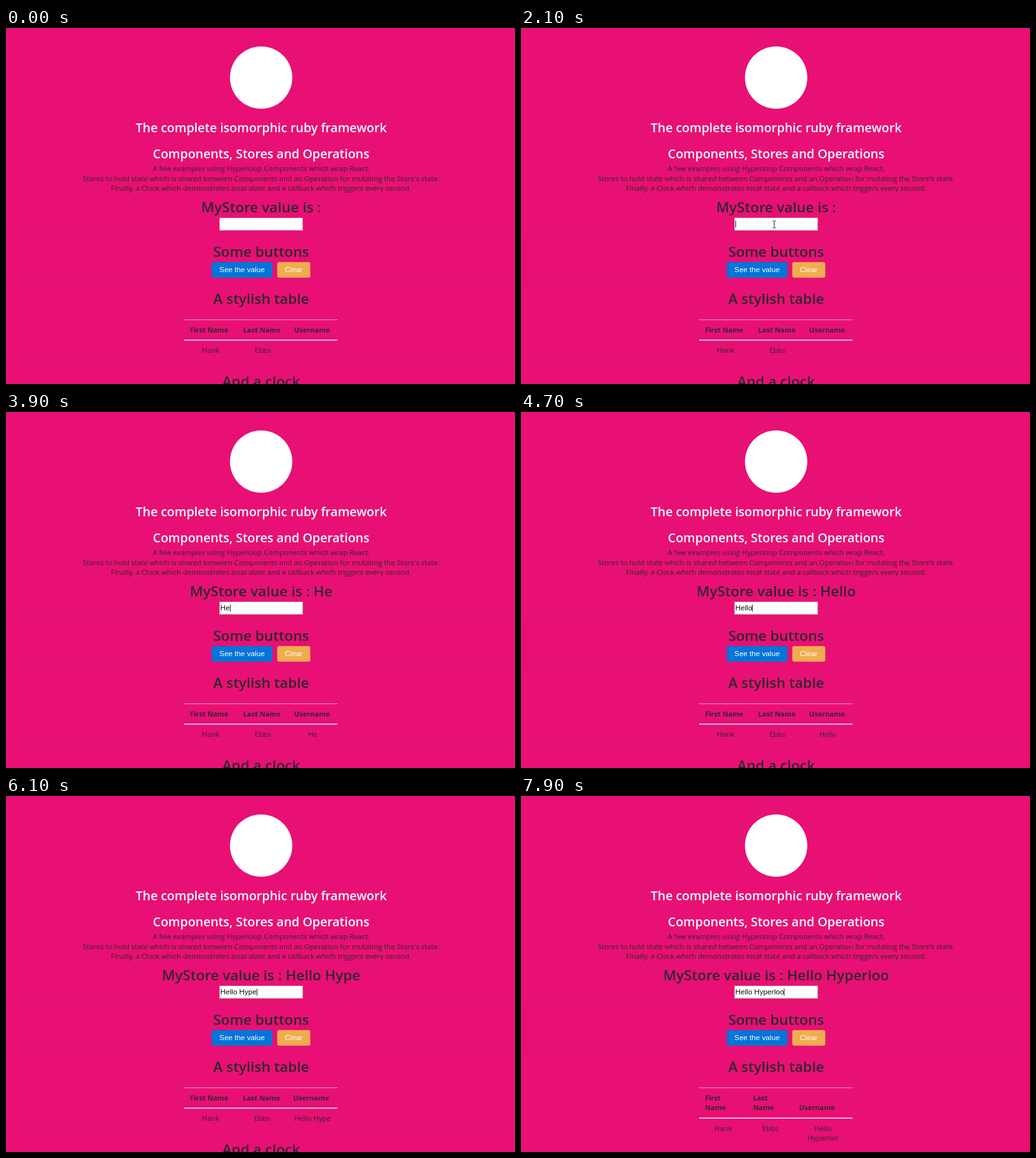
Recreate the animation shown at these times as an HTML page with a canvas. Size 800x560 px, loop 8000 ms.

```html
<!DOCTYPE html>
<html lang="en">
<head>
<meta charset="utf-8">
<title>Components, Stores and Operations</title>
<style>
  html, body { margin: 0; width: 800px; height: 560px; overflow: hidden; background: #e81074; }
  canvas { display: block; }
</style>
</head>
<body>
<canvas id="stage" width="800" height="560"></canvas>
<script>
const ctx = document.getElementById('stage').getContext('2d');

const LOOP = 8000;
const PINK = '#e81074', DARK = '#2d2730', WHITE = '#fff';
const SANS = '"Open Sans", "Noto Sans", sans-serif';
const ARIAL = '"Liberation Sans", Arial, sans-serif';
const TITLE = `600 19.5px ${SANS}`;
const HEADING = `600 22.4px ${SANS}`;
const BODY = `400 11.32px ${SANS}`;
const TH = `700 11px ${SANS}`;
const CONTROL = `11.67px ${ARIAL}`;

const MID = 401;
const PHRASE = 'Hello Hyperloo';
const KEYS = [3700, 3900, 4050, 4200, 4400, 4900, 5200, 5500, 5800, 6000, 6200, 6400, 6550, 6800];
const POINTER_IN = 1700, FOCUS = 2000;

function text(str, x, y, font, color = DARK, align = 'center') {
  ctx.font = font;
  ctx.fillStyle = color;
  ctx.textAlign = align;
  ctx.fillText(str, x, y);
}

function rect(x, y, w, h, color) {
  ctx.fillStyle = color;
  ctx.fillRect(x, y, w, h);
}

function button(label, x, w, color) {
  ctx.fillStyle = color;
  ctx.beginPath();
  ctx.roundRect(x, 368.2, w, 24.6, 3);
  ctx.fill();
  text(label, x + w / 2, 384, CONTROL, WHITE);
}

function header() {
  ctx.fillStyle = WHITE;
  ctx.beginPath();
  ctx.arc(MID, 78, 49, 0, Math.PI * 2);
  ctx.fill();
  text('The complete isomorphic ruby framework', MID, 164, TITLE, WHITE);
  text('Components, Stores and Operations', MID, 205, TITLE, WHITE);
  text('A few examples using Hyperloop Components which wrap React,', MID, 224.5, BODY);
  text("Stores to hold state which is shared between Components and an Operation for mutating the Store's state.", MID, 240.5, BODY);
  text('Finally, a Clock which demonstrates local state and a callback which triggers every second.', MID, 256, BODY);
}

function sectionEdges(shift) {
  const faint = 'rgba(120,0,60,.09)';
  for (const y of [330, 403, 533 + shift]) rect(5, y, 795, 1, faint);
  rect(5, 331, 1, 72, faint);
}

function field(value, t, lastKey) {
  const focused = t >= FOCUS;
  rect(335, 298, 132, 21, focused ? '#c9748f' : '#e05d96');
  rect(336, 299, 130, 19, WHITE);
  text(value, 336.8, 312, CONTROL, '#111', 'left');
  if (focused && (t - lastKey) % 1000 < 500) {
    rect(Math.round(336.8 + ctx.measureText(value).width), 303, 1, 11, '#222');
  }
  if (t >= POINTER_IN && t < KEYS[0]) pointer(398, 309);
}

function pointer(x, y) {
  rect(x - 0.5, y - 5, 1, 10, '#222');
  for (const dy of [-6, 5]) {
    rect(x - 2.5, y + dy, 2, 1, '#222');
    rect(x + 0.5, y + dy, 2, 1, '#222');
  }
}

// Automatic table layout: spare room is shared by content width.
function columns(user, wrapped) {
  const total = 241, pad = 16.8;
  ctx.font = BODY;
  const max = [78.4, 75, Math.max(72.6, ctx.measureText(user).width + pad)];
  const sum = a => a.reduce((p, v) => p + v, 0);
  if (!wrapped) return max.map(v => v * total / sum(max));
  const min = [50, 50, 72.6];
  const share = (total - sum(min)) / (sum(max) - sum(min));
  return max.map((v, i) => min[i] + (v - min[i]) * share);
}

function table(user) {
  const wrapped = user.length > 12;
  const widths = columns(user, wrapped);
  const drop = wrapped ? 15.7 : 0;
  const heads = ['First Name', 'Last Name', 'Username'];
  const cells = ['Hank', 'Ebbs', user];
  rect(280, 458.4, 241, 1, 'rgba(255,255,255,.62)');
  rect(280, 490.2 + drop, 241, 1.5, 'rgba(255,255,255,.9)');
  let x = 280;
  widths.forEach((w, i) => {
    const head = wrapped ? heads[i].split(' ') : [heads[i]];
    const first = 478.5 + drop - (head.length - 1) * 15.7;
    head.forEach((s, n) => text(s, x + 9.2, first + n * 15.7, TH, DARK, 'left'));
    const lines = wrapped ? cells[i].split(' ') : [cells[i]];
    lines.forEach((s, n) => text(s, x + w / 2, 511 + drop + n * 15.7, BODY));
    x += w;
  });
  return drop * 2;
}

function draw(t) {
  const typed = KEYS.filter(k => k <= t).length;
  const value = PHRASE.slice(0, typed);
  const lastKey = typed ? KEYS[typed - 1] : FOCUS;
  rect(0, 0, 800, 560, PINK);
  header();
  text(('MyStore value is : ' + value).trim(), MID, 290, HEADING);
  field(value, t, lastKey);
  text('Some buttons', MID, 359.5, HEADING);
  button('See the value', 323.3, 95.4, '#0275d8');
  button('Clear', 426.3, 52, '#f0ad4e');
  text('A stylish table', MID, 433.6, HEADING);
  const shift = table(value.trim());
  text('And a clock', MID, 563.5 + shift, HEADING);
  sectionEdges(shift);
}

let start;
function frame(now) {
  start ??= now;
  draw((now - start) % LOOP);
  requestAnimationFrame(frame);
}
draw(0);
requestAnimationFrame(frame);
</script>
</body>
</html>
```
